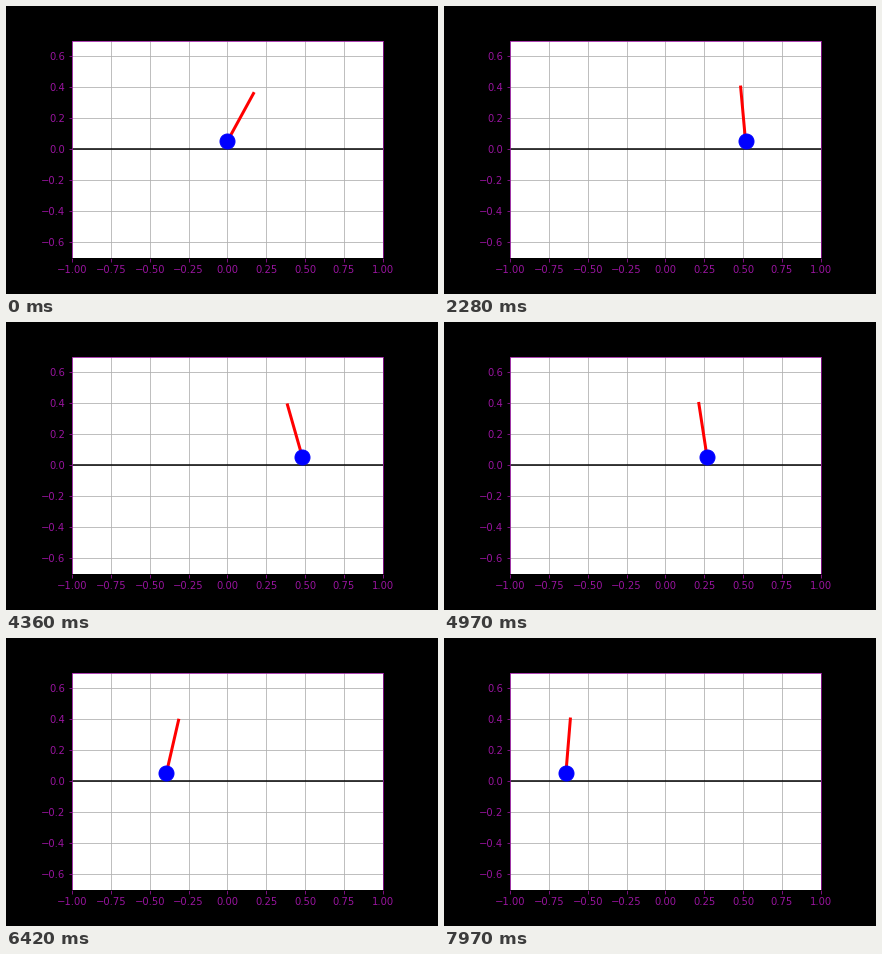
A matplotlib script for the animation above (8 s loop, 432x288 px).

```python
import numpy as np
import matplotlib.pyplot as plt
from matplotlib.animation import FuncAnimation

FRAMES, LOOP_MS = 288, 8000
ROD = 0.35
PIVOT_Y = 0.052
INK = "#98149e"

# Key poses of the balancing act: step, cart position, rod tilt in radians
POSES = np.array([
    (0, 0, .5),            # starts tilted, at rest
    (20, .176, .09),       # cart has dashed under the rod
    (38, .331, -.115),
    (82, .516, -.09),
    (105, .578, -.1),      # short push to tip the rod back
    (120, .626, -.28),
    (133, .615, -.325),    # turning point
    (179, .258, -.147),
    (207, -.079, .03),
    (231, -.393, .226),    # braking
    (287, -.645, .079),
])


def smooth(t, keys, values):
    """Cubic Hermite curve through the key values, starting at rest."""
    slope = np.gradient(values, keys)
    slope[0] = 0
    i = np.clip(np.searchsorted(keys, t, side="right") - 1, 0, len(keys) - 2)
    h = keys[i + 1] - keys[i]
    u = (t - keys[i]) / h
    return ((1 + 2 * u) * (1 - u) ** 2 * values[i]
            + u * (1 - u) ** 2 * h * slope[i]
            + u ** 2 * (3 - 2 * u) * values[i + 1]
            + u ** 2 * (u - 1) * h * slope[i + 1])


keys, key_x, key_tilt = POSES.T
steps = np.arange(FRAMES)
cart_x = smooth(steps, keys, key_x)
tilt = smooth(steps, keys, key_tilt)

plt.rcParams.update({"font.family": "DejaVu Sans", "font.size": 10})
fig = plt.figure(figsize=(6, 4), dpi=72, facecolor="black")
fig.subplots_adjust(left=0.125, right=0.9, bottom=0.125, top=0.88)
ax = fig.add_subplot(aspect="equal", xlim=(-1, 1), ylim=(-0.7, 0.7))
ax.grid(True)
ax.tick_params(color=INK, labelcolor=INK)
ax.spines[["left", "top", "right"]].set_color(INK)
ax.axhline(0, color="black", lw=1.5)
rod, = ax.plot([], [], color="red", lw=3)
cart, = ax.plot([], [], "o", color="blue", ms=15)


def draw(k):
    x, a = cart_x[k], tilt[k]
    rod.set_data([x, x + ROD * np.sin(a)],
                 [PIVOT_Y, PIVOT_Y + ROD * np.cos(a)])
    cart.set_data([x], [PIVOT_Y])
    return rod, cart


anim = FuncAnimation(fig, draw, frames=FRAMES, init_func=lambda: draw(0),
                     interval=LOOP_MS / FRAMES, repeat=True, repeat_delay=0)
plt.show()
```
